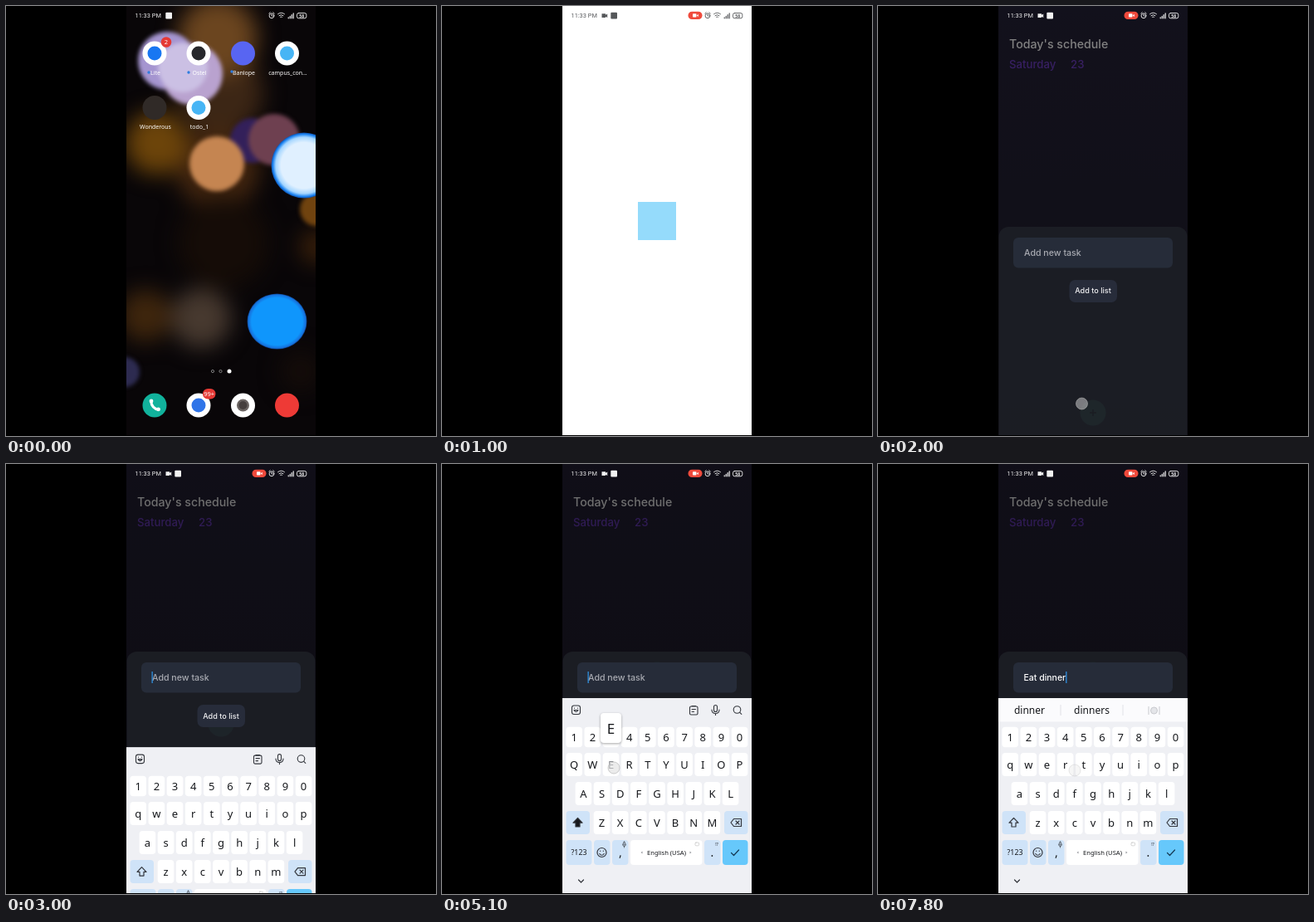
These frames come from a looping animation (518 by 518 pixels, 8 s). An HTML page:

```html
<!DOCTYPE html>
<html lang="en">
<head>
<meta charset="utf-8">
<title>Todo app</title>
<style>
  html, body { margin: 0; width: 100%; height: 100%; overflow: hidden; background: #000; }
  svg { display: block; width: 100vw; height: 100vh; }
  text { font-family: "Noto Sans", "Open Sans", sans-serif; white-space: pre; }
  .app text { font-family: Inter, "Open Sans", sans-serif; }
  .app .kb text { font-family: "Noto Sans", "Open Sans", sans-serif; fill: #16181c; }
  .mid { text-anchor: middle; }
  .label { font-size: 7px; fill: #fff; text-anchor: middle; }
  .line { fill: none; stroke: currentColor; stroke-linecap: round; stroke-linejoin: round; }
  .kb { color: #33363c; }
  .key { font-size: 13px; text-anchor: middle; }
  .app .kb .pressed { fill: #85878c; }
  #glows { filter: blur(13px); }
  #lights { filter: blur(2.5px); }
  #popup { filter: drop-shadow(0 1px 1.5px rgba(0, 0, 0, .35)); }
</style>
</head>
<body>
<svg viewBox="0 0 518 518">
  <defs>
    <clipPath id="screen"><rect x="145" width="228" height="517"/></clipPath>
    <linearGradient id="night" x2="0" y2="1">
      <stop stop-color="#221f34"/><stop offset="1" stop-color="#1d1b28"/>
    </linearGradient>
    <radialGradient id="glare">
      <stop offset=".7" stop-color="#e0f0ff"/><stop offset=".86" stop-color="#a5d6ff"/><stop offset=".95" stop-color="#1d84f2"/><stop offset="1" stop-color="#0f4fa8"/>
    </radialGradient>
    <radialGradient id="azure">
      <stop offset=".85" stop-color="#0f96fc"/><stop offset=".96" stop-color="#1671dc"/><stop offset="1" stop-color="#0c3a7c"/>
    </radialGradient>
  </defs>
  <rect width="518" height="518"/>
  <g clip-path="url(#screen)">
    <g id="home">
      <rect x="145" width="228" height="518" fill="#090608"/>
      <g id="glows"></g>
      <g id="lights"></g>
      <circle cx="359" cy="192" r="39.500" fill="url(#glare)"/>
      <ellipse cx="326.500" cy="380" rx="36" ry="33.500" fill="url(#azure)"/>
      <g id="icons"></g>
      <g fill="#e53935">
        <circle cx="193" cy="43.500" r="6.300"/>
        <rect x="237" y="461" width="15.500" height="12.500" rx="6.200"/>
      </g>
      <g class="mid" fill="#fff" font-size="7.500">
        <text x="193" y="46.300">2</text><text x="244.700" y="470">99+</text>
      </g>
      <g fill="#2f7de0"><circle cx="172" cy="80" r="1.700"/><circle cx="220" cy="80" r="1.700"/><circle cx="272" cy="79" r="1.700"/></g>
      <g fill="none" stroke="#999" stroke-width=".8"><circle cx="249" cy="440" r="1.600"/><circle cx="258.500" cy="440" r="1.600"/></g>
      <circle cx="269" cy="440" r="2.500" fill="#fff"/>
      <path d="M174.500 475.500Q175.500 485 184 486.300" fill="none" stroke="#fff" stroke-width="3" stroke-linecap="round"/>
      <g fill="#fff"><circle cx="175" cy="476" r="2.400"/><circle cx="183.500" cy="485.800" r="2.400"/></g>
      <circle cx="285.500" cy="481" r="7.500" fill="#6b6462"/><circle cx="285.500" cy="481" r="5" fill="#463f3e"/>
    </g>
    <g id="splash">
      <rect id="window" fill="#fff"/>
      <rect id="mark" x="236" y="236" width="46" height="46" fill="#54c5f8"/>
    </g>
    <g id="app" class="app">
      <rect x="145" width="228" height="518" fill="url(#night)"/>
      <text x="158" y="51" font-size="14.200" font-weight="500" fill="#f2f2f2">Today's schedule</text>
      <g font-size="13.200" font-weight="500" fill="#673ab7"><text x="158" y="75.300">Saturday</text><text x="232" y="75.300">23</text></g>
      <g id="fab">
        <circle r="15.500" fill="#64ffda"/>
        <path d="M-4 0H4M0-4V4" stroke="#000" stroke-width="1.500"/>
      </g>
      <rect id="barrier" x="145" width="228" height="518"/>
      <g id="sheet">
        <rect x="145.500" width="227" height="560" rx="12" fill="#1d1f25" fill-opacity=".93"/>
        <rect x="163" y="13" width="192" height="36.500" rx="6" fill="#262c39"/>
        <text id="hint" x="176" y="35.300" font-size="10.600" font-weight="500" fill="#a9abb2">Add new task</text>
        <text id="field" x="175.500" y="35.300" font-size="10.500" font-weight="500" fill="#fff"></text>
        <rect id="cursor" y="24" width="1.300" height="14" fill="#2f8fe0"/>
        <rect x="230.500" y="64" width="57.500" height="27" rx="7" fill="#272c3a"/>
        <text class="mid" x="259" y="80.500" font-size="9.100" font-weight="500" fill="#f0f0f2">Add to list</text>
      </g>
      <g id="kb" class="kb">
        <rect x="145" width="228" height="240" fill="#eff0f4"/>
        <g class="line" stroke-width="1.100">
          <rect x="156.500" y="9" width="10" height="10.500" rx="2.500"/><path d="M159 14.500h5q-2.500 4-5 0zM159.500 12v.2M163.500 12v.2"/>
          <rect x="298.500" y="10" width="9.500" height="10" rx="1.500"/><path d="M301 9.500h4.500M301 13.500h4.500M301 16.500h2.500"/>
          <rect x="327.500" y="8.500" width="4" height="8" rx="2"/><path d="M325 14q0 4.500 4.500 4.500t4.500-4.500M329.500 18.500v2"/>
          <circle cx="355.500" cy="14" r="4.300"/><path d="M358.800 17.300l2 2"/>
        </g>
        <g id="strip">
          <rect x="145" width="228" height="28.500" fill="#fbfbfd"/>
          <path d="M220 8v13M295 8v13" stroke="#dcdde1" stroke-width=".8"/>
          <g class="mid" font-size="12"><text x="182.500" y="19"></text><text x="257.500" y="19"></text><text x="332.500" y="19"></text></g>
          <g id="plate" fill="none" stroke="#c8c9ce"><circle cx="332.500" cy="15" r="4" fill="#e4e5e9"/><path d="M326 10v10M339 10v10"/></g>
        </g>
        <g id="keys"></g>
        <g class="line" stroke-width="1.200">
          <path id="shift" d="M163.500 144.500l5.500 5.700h-3v4.800h-5v-4.800h-3z"/>
          <path d="M348 150l3.500-4.500h9v9h-9zM354 148l4 4M358 148l-4 4"/>
          <circle cx="192.500" cy="186" r="5.500"/><path d="M189.800 187.500q2.700 3.500 5.400 0M190.700 184v.3M194.300 184v.3"/>
          <path d="M348.500 186.500l3 3 6-6.500" stroke="#163a55"/>
          <path d="M164.500 219l3 3 3-3"/>
          <g stroke-width=".7"><path d="M217.500 176q0 2.500 2 2.500t2-2.500M219.500 178.500v1.500"/><rect x="218.700" y="173" width="1.600" height="4" rx=".8"/></g>
          <rect x="305" y="174" width="4.500" height="3.800" rx="1" stroke-width=".6" stroke="#bbb"/>
        </g>
        <g class="mid">
          <text x="165" y="189" font-size="8.800">?123</text>
          <text x="215" y="191" font-size="14">,</text><text x="325.500" y="191" font-size="14">.</text>
          <text x="331" y="177.500" font-size="5">!?</text>
          <text x="270.500" y="189" font-size="7.600">English (USA)</text>
        </g>
        <path d="M241.500 184.500v3l-2-1.500zM298.500 184.500v3l2-1.500z" fill="#9a9ca2"/>
        <g id="popup">
          <rect x="-12.500" y="-62" width="25" height="36" rx="4" fill="#fff"/>
          <text class="mid" y="-37.500" font-size="17"></text>
        </g>
      </g>
    </g>
    <g id="status">
      <text x="155.500" y="14.200" font-size="7.400" fill="currentColor" style="font-family:Roboto,sans-serif">11:33 PM</text>
      <path id="cam" d="M192.500 9.300h4.500v1.500l2.200-1.300v4.500l-2.200-1.300v1.300h-4.500z" fill="currentColor"/>
      <rect id="note" y="7.800" width="7.700" height="7.700" rx="1" fill="currentColor"/>
      <g id="pill">
        <rect x="296.500" y="6.700" width="17" height="9.300" rx="4.600" fill="#ef4a3c"/>
        <rect x="302" y="9.300" width="4.500" height="4.200" rx=".8" fill="#fff"/><path d="M306.800 11.400l2-1.600v3.200z" fill="#fff"/>
      </g>
      <g class="line" stroke-width=".9">
        <circle cx="320" cy="11.800" r="2.900"/><path d="M320 10.200v1.800h1.200M316.800 9l1.400-1.300M323.200 9l-1.400-1.300"/>
        <path d="M327.500 9.700q4-3.200 8 0M329 11.600q2.500-2 5 0M330.500 13.300q1-.8 2 0"/>
        <path d="M340.200 14.800v-1M342.200 14.800v-2.500M344.200 14.800v-4.200M346.200 14.800v-6" stroke-width="1.200"/>
        <rect x="350.500" y="8.500" width="11.300" height="6.300" rx="2"/>
      </g>
      <text class="mid" x="356.200" y="13.500" font-size="5" font-weight="700" fill="currentColor">58</text>
    </g>
    <g id="dots"></g>
  </g>
</svg>
<script>
const NS = "http://www.w3.org/2000/svg";
const $ = id => document.getElementById(id);

function add(parent, tag, attrs, content) {
  const el = document.createElementNS(NS, tag);
  set(el, attrs);
  if (content) el.textContent = content;
  return parent.appendChild(el);
}
function set(el, attrs) {
  for (const k in attrs) el.setAttribute(k, attrs[k]);
}
const show = (el, on) => { el.style.display = on ? "" : "none"; };
const moveTo = (el, x, y) => set(el, { transform: `translate(${x} ${y})` });

// Wallpaper circles: x, y, radius, colour
function circles(group, list) {
  list.forEach(([cx, cy, r, fill]) => add(group, "circle", { cx, cy, r, fill }));
}
circles($("glows"), [
  [258, 105, 52, "#3c2615"], [255, 38, 48, "#6b451f"], [255, 195, 50, "#43260f"],
  [182, 165, 38, "#6c440a"], [262, 285, 55, "#150c07"], [168, 373, 31, "#3f260d"],
  [235, 376, 36, "#47392f"], [374, 290, 20, "#3a200a"], [355, 440, 25, "#140c09"]
]);
circles($("lights"), [
  [194, 66, 35, "#a595d0"], [224, 82, 37, "#b9a2cf"], [213, 74, 30, "#cbc0e4"],
  [297, 162, 27, "#33205a"], [323, 161, 31, "#6e4050"], [254, 190, 33, "#c58551"],
  [374, 245, 20, "#70430f"], [143, 441, 18, "#2d2b50"]
]);

// Launcher icons: x, y, disc, inner colour, label
[
  [179, 57, "#fff", "#1877f2", "Lite"], [232, 57, "#fff", "#26272b", "Ostel"],
  [285.5, 57, "#5865f2", "", "Banlope"], [338.5, 57, "#fff", "#47b5f5", "campus_con..."],
  [179, 122.5, "#302a27", "", "Wonderous"], [232, 122.5, "#fff", "#47b5f5", "todo_1"],
  [179, 481, "#11b29c"], [232, 481, "#fff", "#2f74e8"], [285.5, 481, "#fff"], [338.5, 481, "#ee3a36"]
].forEach(([cx, cy, disc, inner, label]) => {
  add($("icons"), "circle", { cx, cy, r: 14.5, fill: disc });
  if (inner) add($("icons"), "circle", { cx, cy, r: 8.5, fill: inner });
  if (label) add($("icons"), "text", { x: cx + 1, y: cy + 25.7, class: "label" }, label);
});

const keys = {};
function plate(x, y, width, height, fill) {
  add($("keys"), "rect", { x, y, width, height, rx: 4, fill });
}
function row(chars, x0, y, h) {
  [...chars].forEach((ch, i) => {
    const x = x0 + i * 22.15;
    plate(x - 9.8, y - h / 2, 19.6, h, "#fff");
    keys[ch] = { x, y, el: add($("keys"), "text", { x, y: y + 4.7, class: "key" }, ch) };
  });
}
row("1234567890", 159.2, 47, 24.5);
row("qwertyuiop", 159.2, 80, 28);
row("asdfghjkl", 170.4, 115, 28);
row("zxcvbnm", 192.5, 150, 28);
const TINT = "#cfe3f8";
plate(149.5, 136, 28.5, 28, TINT);
plate(340, 136, 28.5, 28, TINT);
[[149.5, 31, TINT], [183, 19.5, TINT], [205, 19.5, TINT], [227, 86.5, "#fff"], [316, 19.5, TINT], [338, 30.5, "#66c8fb"]]
  .forEach(([x, w, fill]) => plate(x, 171, w, 30, fill));

// Taps: press time, release time, x, y, typed character
const taps = [
  [400, 500, 234, 125], [1800, 2200, 245.5, 479], [2600, 2800, 209.5, 251], [4600, 4700, 166, 435],
  [5000, 5200, 207, 366, "E"], [5200, 5300, 174, 401, "a"], [5300, 5400, 251, 366, "t"], [5500, 5600, 262, 479, " "],
  [6800, 6900, 218, 401, "d"], [7000, 7100, 317, 366, "i"], [7100, 7200, 306, 436, "n"],
  [7300, 7400, 306, 436, "n"], [7400, 7500, 207, 366, "e"], [7600, 7700, 237, 369, "r"]
];
const dots = taps.map(([, , cx, cy]) =>
  add($("dots"), "circle", { cx, cy, r: 7, fill: "#dadada", "fill-opacity": .5, stroke: "#b0b0b0", "stroke-opacity": .6 }));

const hints = [
  "", "E Every Even", "Each Eat Easy", "Eat Eating Eats", "it and a", "d do did", "did dinner diet",
  "dinner din dine", "dinner dinner's", "dinner dinners", "dinner dinners"
].map(s => s.split(" "));

const clamp = u => Math.min(1, Math.max(0, u));
const easeOut = (t, start, length, power) => 1 - (1 - clamp((t - start) / length)) ** power;

function drawLauncher(t) {
  show($("home"), t < 800);
  show($("splash"), t >= 600 && t < 1100);
  const u = easeOut(t, 500, 300, 2), mix = (a, b) => a + (b - a) * u;
  set($("window"), { x: mix(218, 145), y: mix(108, 0), width: mix(28, 228), height: mix(28, 518), rx: mix(14, 0) });
  show($("mark"), t >= 800);
  set($("mark"), { opacity: t < 1000 ? 1 : .62 });
}

function drawStatus(t) {
  const rec = t >= 200;
  $("status").style.color = t >= 700 && t < 1300 ? "#55575a" : "#f2f2f2";
  show($("cam"), rec);
  show($("pill"), rec);
  set($("note"), { x: rec ? 203.3 : 192.3 });
}

function drawKeyboard(t, top, text) {
  show($("kb"), top < 518);
  moveTo($("kb"), 0, top);
  const caps = t >= 4700 && t < 5200;
  const tap = taps.find(p => p[4] && p[4] !== " " && t >= p[0] && t < p[1]);
  const active = tap && keys[tap[4].toLowerCase()];
  for (const ch in keys) {
    const { el } = keys[ch];
    el.textContent = caps ? ch.toUpperCase() : ch;
    el.classList.toggle("pressed", keys[ch] === active);
  }
  $("shift").style.fill = caps ? "#16181c" : "none";
  show($("popup"), active);
  if (active) {
    moveTo($("popup"), active.x, active.y);
    $("popup").lastElementChild.textContent = tap[4];
  }
  show($("strip"), text);
  $("strip").querySelectorAll("text").forEach((el, i) => { el.textContent = hints[text.length][i] || ""; });
  show($("plate"), text.length > 8);
}

function drawApp(t) {
  show($("app"), t >= 1100);
  const open = easeOut(t, 1800, 400, 2.87);
  const top = 518 - 236 * easeOut(t, 2800, 500, 2.71);
  moveTo($("fab"), 259, top - 28);
  set($("barrier"), { opacity: .54 * open });
  moveTo($("sheet"), 0, 518 - 292 * open);

  const typed = taps.filter(p => p[4] && t >= p[1]);
  const text = typed.map(p => p[4]).join("");
  const since = typed.length ? typed[typed.length - 1][1] : 2800;
  $("field").textContent = text;
  show($("hint"), !text);
  show($("cursor"), t >= 2800 && Math.floor((t - since) / 500) % 2 === 0);
  set($("cursor"), { x: 175.5 + (text ? $("field").getComputedTextLength() : 0) });
  drawKeyboard(t, top, text);
}

function draw(t) {
  drawLauncher(t);
  drawApp(t);
  drawStatus(t);
  taps.forEach(([down, up], i) =>
    set(dots[i], { opacity: t < down ? 0 : 1 - clamp((t - up) / 200) }));
}

const LOOP = 8000, STEP = 100, start = performance.now();
let last = -1;
function tick() {
  const t = Math.floor(((performance.now() - start) % LOOP) / STEP) * STEP;
  if (t !== last) draw(last = t);
  requestAnimationFrame(tick);
}
tick();
</script>
</body>
</html>
```
